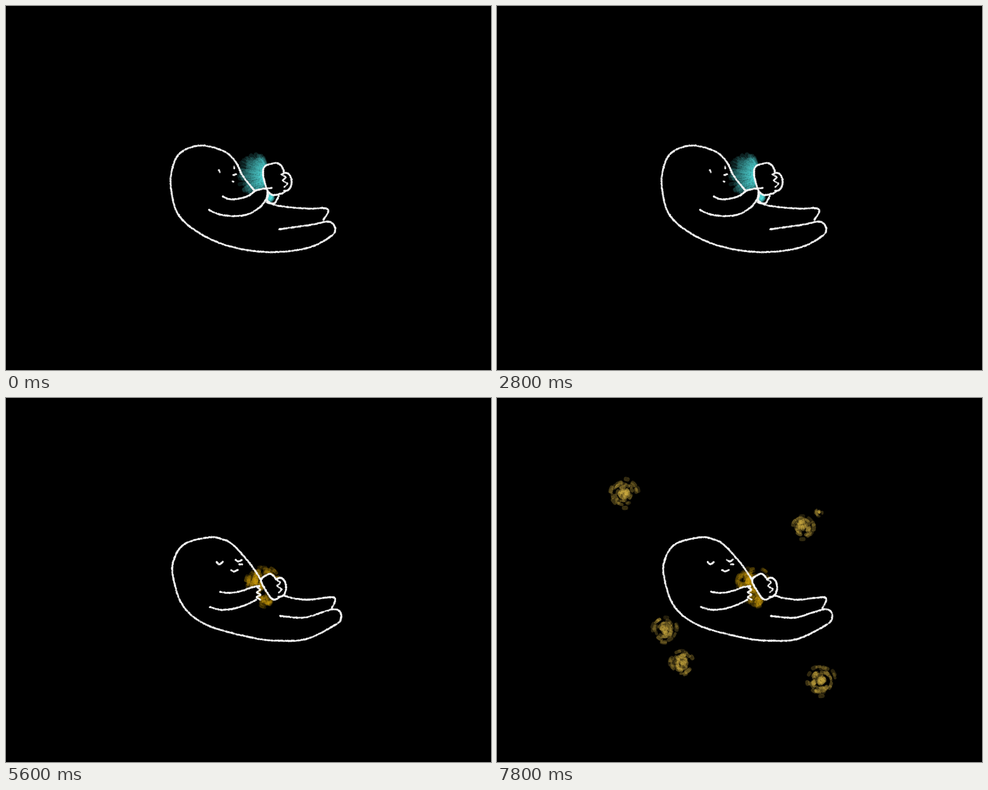
An HTML page with a canvas for the animation above (8 s loop, 864 by 648 pixels).

```html
<!DOCTYPE html>
<html lang="en">
<head>
<meta charset="utf-8">
<title>Night light</title>
<style>
html, body { margin: 0; width: 100%; height: 100%; overflow: hidden; background: #000; }
canvas { display: block; width: 864px; height: 648px; }
</style>
</head>
<body>
<canvas id="stage" width="864" height="648"></canvas>
<script>
const ctx = document.getElementById('stage').getContext('2d');
const STEP = 200, FRAMES = 40;
const SETTLE = 23, SLEEP = 28, FLIES = 34;
const CYAN = '84,228,228', GOLD = '204,156,12', PALE_GOLD = '208,174,66';

// Key points of the two figures; curves run through them.
const AWAKE = {
  body: '444,327 424,302 411,277 390,258 348,248 312,261 297,290 295,325 308,371 346,404 400,427 470,437 540,429 583,407 589,392 577,382 545,388 489,396',
  leg: '467,348 492,355 540,359 570,358 577,364 568,379',
  upperArm: '386,339 399,344 415,343 433,337 446,328',
  lowerArm: '362,363 380,371 405,374 430,371 450,360 463,345 466,330',
  face: ['379,292 381,296', '406,286 407,289', '405,301 410,299', '403,312 405,313']
};
const ASLEEP = {
  body: '454,323 434,294 405,262 387,252 362,248 318,260 299,288 298,320 316,371 360,405 440,427 485,432 535,429 588,403 597,390 594,379 583,376 565,381 530,391 488,388',
  leg: '496,352 515,357 540,359 565,356 584,355 586,362 580,374',
  upperArm: '381,345 398,347 418,344 438,337 451,335',
  lowerArm: '363,372 382,377 405,375 428,368 446,359',
  face: ['375,292 380,296 386,292', '409,288 414,291 420,288', '416,296 421,296', '401,306 406,309 413,306']
};

// head and feet: how far each end of the figure leans in this pose.
// phone: x, y, half width, half height, tilt, squareness. thumb: x, y, radii.
// beam: from and to angle, reach, strength. puff: reach of the light below.
const POSES = {
  A: { figure: AWAKE, head: [-1, 0], feet: [-3, 2], hand: '462,325 473,324',
       phone: [479, 308, 19, 28, -14, 3.2], thumb: [498, 313, 11, 16], beam: [118, 252, 62, .2], puff: 17 },
  B: { figure: AWAKE, head: [2, 1], feet: [4, 0], hand: '456,314 460,307',
       phone: [476, 306, 18, 29, -10, 4], thumb: [494, 309, 9, 13], beam: [118, 275, 68, .26], puff: 27 },
  C: { figure: AWAKE, head: [1, -1], feet: [0, 1], hand: '456,315 462,312',
       phone: [479, 306, 18, 28, -14, 2.3], thumb: [498, 308, 8, 13], beam: [124, 300, 70, .3], puff: 39 },
  D: { figure: AWAKE, head: [-3, 0], feet: [5, -1], hand: '456,318 466,315',
       phone: [481, 310, 17, 28, -10, 2], thumb: [498, 310, 8, 13], beam: [138, 300, 58, .3], puff: 29 },
  sleep: { figure: ASLEEP, head: [0, 0], feet: [0, 0], hand: '451,335',
       phone: [474, 336, 13, 23, -32, 4], thumb: [488, 337, 11, 17] }
};

// Drifting lights: x, y, radius.
const LIGHTS = [[226, 170, 29], [544, 230, 24], [573, 204, 8], [299, 413, 26], [329, 471, 26], [576, 503, 31]];

function poseAt(frame) {
  if (frame >= SLEEP) return 'sleep';
  if (frame % 2 === 0) return 'A';
  if (frame >= SETTLE) return 'D';
  return frame % 12 < 6 ? 'B' : 'C';
}

let rand;
function seed(n) {
  let s = n * 7919 + 17;
  rand = () => {
    s = (s + 0x6D2B79F5) | 0;
    let t = Math.imul(s ^ (s >>> 15), 1 | s);
    t ^= t + Math.imul(t ^ (t >>> 7), 61 | t);
    return ((t ^ (t >>> 14)) >>> 0) / 4294967296;
  };
}
const between = (a, b) => a + (b - a) * rand();
const radians = degrees => degrees * Math.PI / 180;
const points = text => text.split(' ').map(p => p.split(',').map(Number));

function lean(pts, { head, feet }) {
  return pts.map(([x, y]) => {
    const t = (x - 295) / 295;
    return [x + head[0] + (feet[0] - head[0]) * t, y + head[1] + (feet[1] - head[1]) * t];
  });
}

// Catmull-Rom curve, sampled about once per pixel.
function curve(pts) {
  const out = [];
  for (let i = 0; i < pts.length - 1; i++) {
    const p1 = pts[i], p2 = pts[i + 1], p0 = pts[i - 1] || p1, p3 = pts[i + 2] || p2;
    const steps = Math.ceil(Math.hypot(p2[0] - p1[0], p2[1] - p1[1])) || 1;
    for (let k = 0; k <= steps; k++) {
      const t = k / steps;
      out.push([0, 1].map(a => p1[a] + t * ((p2[a] - p0[a]) / 2 +
        t * (p0[a] - 2.5 * p1[a] + 2 * p2[a] - p3[a] / 2 +
        t * (1.5 * (p1[a] - p2[a]) + (p3[a] - p0[a]) / 2)))));
    }
  }
  return out;
}

// Rounded box or ellipse, depending on squareness; from and to cut an arc.
function oval(x, y, w, h, tilt = 0, squareness = 2, from = 0, to = 360) {
  const out = [], turn = radians(tilt);
  const bend = v => Math.sign(v) * Math.abs(v) ** (2 / squareness);
  for (let a = from; a <= to; a += 15) {
    const px = w * bend(Math.cos(radians(a))), py = h * bend(Math.sin(radians(a)));
    out.push([x + px * Math.cos(turn) - py * Math.sin(turn), y + px * Math.sin(turn) + py * Math.cos(turn)]);
  }
  return out;
}

function zigzag(x, y, width, height, slope, teeth) {
  return Array.from({ length: teeth }, (_, i) => {
    const t = i / (teeth - 1);
    return [x + slope * t + (i % 2 ? width : 0), y + height * t];
  });
}

function blackout(pts) {
  ctx.fillStyle = '#000';
  ctx.beginPath();
  pts.forEach(p => ctx.lineTo(...p));
  ctx.fill();
}

function chalk(pts, size = 1.8) {
  for (const [x, y] of curve(pts)) {
    ctx.fillStyle = `rgba(246,246,246,${between(.4, .95)})`;
    ctx.beginPath();
    ctx.arc(x + between(-.5, .5), y + between(-.5, .5), size * between(.75, 1.1), 0, 7);
    ctx.fill();
  }
}

function beam(x, y, from, to, reach, strength) {
  const light = ctx.createRadialGradient(x, y, 0, x, y, reach);
  light.addColorStop(0, `rgba(${CYAN},${strength})`);
  light.addColorStop(.5, `rgba(${CYAN},${strength})`);
  light.addColorStop(1, `rgba(${CYAN},${strength * .5})`);
  ctx.strokeStyle = light;
  const count = (to - from) / 3;
  for (let i = 0; i < count; i++) {
    const t = (i + rand()) / count, a = radians(from + (to - from) * t);
    const r = reach * between(.65, .95) * (.68 + .32 * Math.sin(Math.PI * t));
    ctx.lineWidth = between(6, 10);
    ctx.beginPath();
    ctx.moveTo(x, y);
    ctx.lineTo(x + Math.cos(a) * r, y + Math.sin(a) * r);
    ctx.stroke();
  }
}

// Short soft arcs around a centre, thicker in the middle.
function smudge(x, y, radius, count, color, alpha) {
  for (let i = 0; i < count; i++) {
    const r = radius * .9 * rand() ** .75, a = between(0, 6.28);
    ctx.strokeStyle = `rgba(${color},${alpha * between(.5, 1) * (1.2 - .5 * r / radius)})`;
    ctx.lineWidth = Math.min(radius * .5, between(4, 8));
    ctx.beginPath();
    ctx.arc(x, y, r, a, a + between(3, 9) / (r + 5));
    ctx.stroke();
  }
}

function grain(x, y, r) {
  ctx.fillStyle = 'rgba(0,0,0,.2)';
  for (let i = r * r * .6; i > 0; i--) ctx.fillRect(between(x - r, x + r), between(y - r, y + r), 1.2, 1.2);
}

function drawLight(pose, frame) {
  if (pose.beam) {
    const [x, y] = pose.phone, [from, to, reach, strength] = pose.beam;
    beam(x - 9, y - 6, from, to, reach, strength);
    beam(x - 8, y + 25, 65, 115, pose.puff, strength);
  } else {
    smudge(459, 331, 38, 110, GOLD, .4);
    smudge(446, 326, 17, 30, GOLD, .35);
    smudge(462, 359, 15, 26, GOLD, .4);
    if (frame >= FLIES) {
      for (const [x, y, r] of LIGHTS) {
        smudge(x, y, r, r * 1.7, PALE_GOLD, .45);
        smudge(x, y, r * .4, r * .4, PALE_GOLD, .4);
        grain(x, y, r);
      }
    }
  }
  grain(450, 312, 62);
}

function drawFigure(pose) {
  const { figure, thumb: [x, y, w, h] } = pose;
  const upperArm = points(figure.upperArm + ' ' + pose.hand), lowerArm = points(figure.lowerArm);
  const phone = oval(...pose.phone);
  const asleep = figure === ASLEEP;

  blackout([...upperArm, ...[...lowerArm].reverse()]);
  chalk(lean(points(figure.body), pose));
  chalk(lean(points(figure.leg), pose));
  blackout(phone);
  chalk(phone);
  chalk(upperArm);
  chalk(lowerArm);
  chalk(asleep ? zigzag(447, 337, 6, 22, 0, 6) : points('467,335 466,347 478,351 486,338'));

  blackout(oval(x, y, w, h));
  chalk(oval(x, y, w, h, 0, 2, -120, 105));
  chalk(zigzag(x - w * .7, y - h * .85, w * .6, h * 1.4, w * .5, 5), 1.5);
  figure.face.forEach(mark => chalk(points(mark), 1.8));
}

function draw(frame) {
  const name = poseAt(frame);
  ctx.fillStyle = '#000';
  ctx.fillRect(0, 0, 864, 648);
  ctx.lineCap = 'round';
  seed(name.charCodeAt(0) + (name === 'sleep' ? frame % 3 : 0));
  drawLight(POSES[name], frame);
  drawFigure(POSES[name]);
}

let shown = -1;
function tick() {
  const frame = Math.floor(performance.now() / STEP) % FRAMES;
  if (frame !== shown) draw(shown = frame);
  requestAnimationFrame(tick);
}
tick();
</script>
</body>
</html>
```
